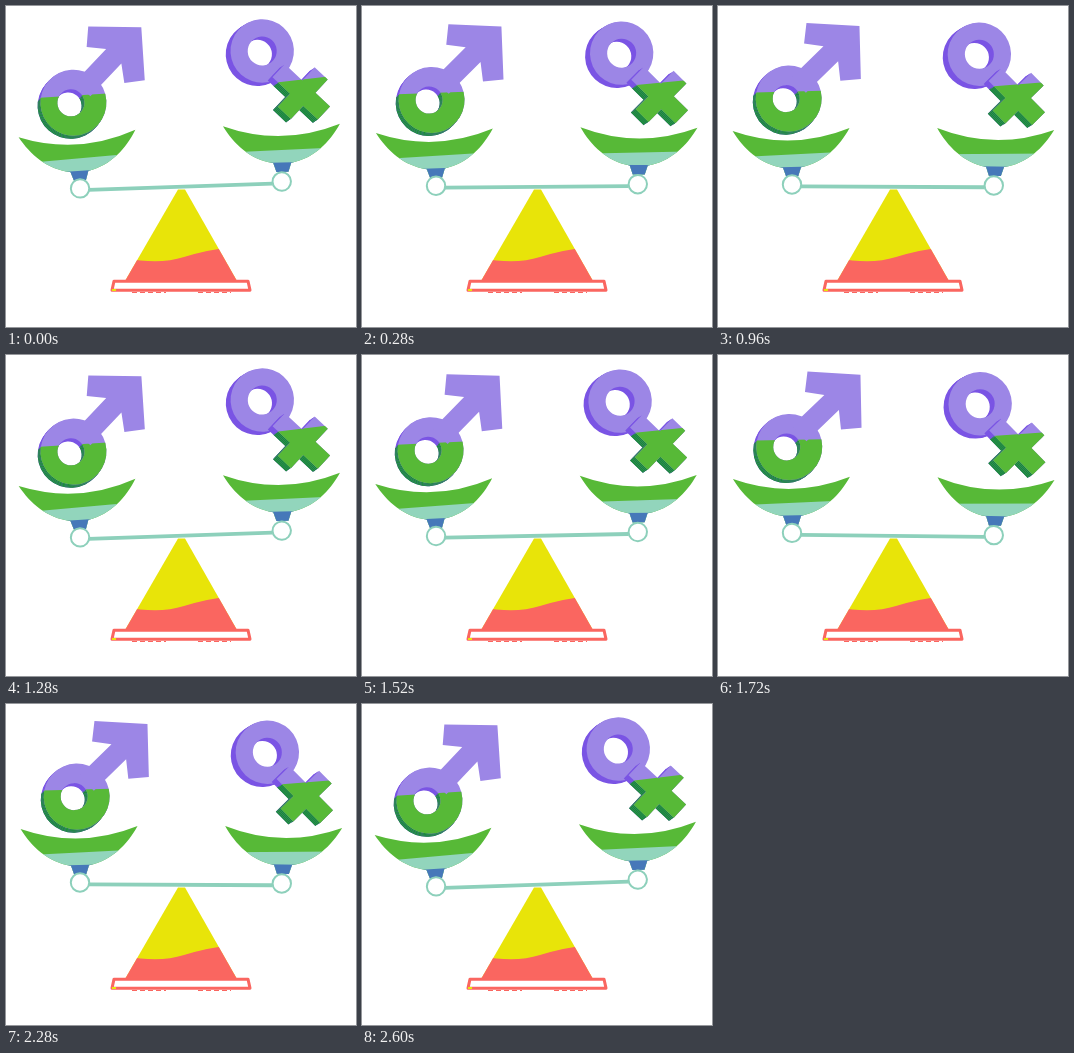
Animation, 350 px wide and 321 px high, one loop 2640 ms. Source, as an HTML page with a canvas:

```html
<!DOCTYPE html>
<html>
<head>
<meta charset="utf-8">
<style>
html, body { margin: 0; width: 350px; height: 321px; overflow: hidden; background: #fff; }
canvas { display: block; }
</style>
</head>
<body>
<canvas id="stage" width="350" height="321"></canvas>
<script>
const ctx = document.getElementById('stage').getContext('2d');
const SWING = 1320, STEP = 40, TILT = 1.95, PIVOT = [174.5, 179];
const PURPLE = '#9c86e6', DARK_PURPLE = '#7a54e4', GREEN = '#57b937', DARK_GREEN = '#189033',
      TEAL = '#92d5bc', BLUE = '#4678b9', BEAM = '#8dd0bb', YELLOW = '#e8e409', RED = '#fa6660';

const rad = degrees => degrees * Math.PI / 180;

// Runs paint with the origin moved to x, y and turned.
function placed([x, y], degrees, paint) {
  ctx.save();
  ctx.translate(x, y);
  ctx.rotate(rad(degrees));
  paint();
  ctx.restore();
}

// The half plane below a line given by its heights at x = -60 and x = 60.
const below = (left, right) => new Path2D(`M-60 ${left}L60 ${right}L180 ${2 * right - left}V400H-400V${left}Z`);

function fillBands(path, base, ...bands) {
  ctx.save();
  ctx.fillStyle = base;
  ctx.fill(path);
  ctx.clip(path);
  for (const [color, area] of bands) {
    ctx.fillStyle = color;
    ctx.fill(area);
  }
  ctx.restore();
}

function donut(x, y, radius, holeX, hole) {
  const path = new Path2D();
  path.arc(x, y, radius, 0, 2 * Math.PI);
  path.closePath();
  path.moveTo(holeX + hole, y);
  path.arc(holeX, y, hole, 2 * Math.PI, 0, true);
  return path;
}

// Mirrors half an outline about an axis that leaves the origin at the given angle.
function mirrored(half, degrees) {
  const outline = [...half.map(([x, y]) => [x, -y]), ...[...half].reverse()];
  const path = new Path2D();
  path.addPath(new Path2D('M' + outline.join('L') + 'Z'), new DOMMatrix().rotate(degrees));
  return path;
}

// A front face with its side wall swept along the depth vector.
function solid(path, [dx, dy], split) {
  for (let s = 1; s > 0; s -= 0.25) {
    placed([dx * s, dy * s], 0, () => fillBands(path, DARK_PURPLE, [DARK_GREEN, split]));
  }
  fillBands(path, PURPLE, [GREEN, split]);
}

const arrow = mirrored([[20, 10.5], [65, 10.5], [53, 26], [69, 39], [105, 0]], -42.8);
const cross = mirrored([[25, 9], [49, 9], [49, 27], [67, 27], [67, 9], [87, 9]], 46.7);
const maleRing = donut(4.5, -0.5, 33, 2, 13.5);
const femaleRing = donut(2, -2.5, 31.7, 2, 14.5);
const maleSplit = below(-7.5, -7.5);
const femaleSplit = below(34, 27.4);

function male() {
  solid(maleRing, [-3, 3], maleSplit);
  fillBands(arrow, PURPLE);
}

function female() {
  solid(femaleRing, [-5, 3], femaleSplit);
  solid(cross, [-5, 3], femaleSplit);
}

const bowl = new Path2D('M-58.5 0Q0 22 58.5 0C48 18 32 34 9 38L6 47H-6L-9 38C-32 34-48 18-58.5 0Z');

function pan() {
  fillBands(bowl, GREEN, [TEAL, below(26.5, 23.5)], [BLUE, below(37.5, 37.5)]);
}

function hinge(x) {
  ctx.beginPath();
  ctx.arc(x, 0, 9.2, 0, 7);
  ctx.fillStyle = '#fff';
  ctx.fill();
  ctx.lineWidth = 2;
  ctx.stroke();
}

function balance() {
  ctx.strokeStyle = BEAM;
  ctx.lineWidth = 3.8;
  ctx.stroke(new Path2D('M-92 1.8H92'));
  placed([-101.7, -55], -1.7, pan);
  placed([102.9, -56.6], 0.7, pan);
  hinge(-100.5);
  hinge(101.3);
  placed([-108.7, -85.3], -1.7, male);
  placed([84.3, -128.6], -1.7, female);
}

function stand() {
  fillBands(new Path2D('M172 183.5H179L231 275H119Z'), YELLOW,
    [RED, new Path2D('M110 250Q150 260 178 251T240 240V300H110Z')]);
  const base = new Path2D('M108 275.2H242L244 284.2H106Z');
  ctx.strokeStyle = RED;
  ctx.lineWidth = 3;
  ctx.lineJoin = 'round';
  ctx.fillStyle = '#fff';
  ctx.fill(base);
  ctx.stroke(base);
  ctx.fillStyle = YELLOW;
  ctx.fillRect(106, 283, 4, 2);
  ctx.lineWidth = 1;
  ctx.setLineDash([5, 3]);
  ctx.stroke(new Path2D('M126 286.5H160M192 286.5H225'));
  ctx.setLineDash([]);
}

function draw(time) {
  const t = Math.floor(time / STEP) * STEP;
  ctx.clearRect(0, 0, 350, 321);
  stand();
  placed(PIVOT, -TILT * Math.cos(2 * Math.PI * t / SWING), balance);
}

function loop() {
  draw(performance.now());
  requestAnimationFrame(loop);
}
loop();
</script>
</body>
</html>
```
